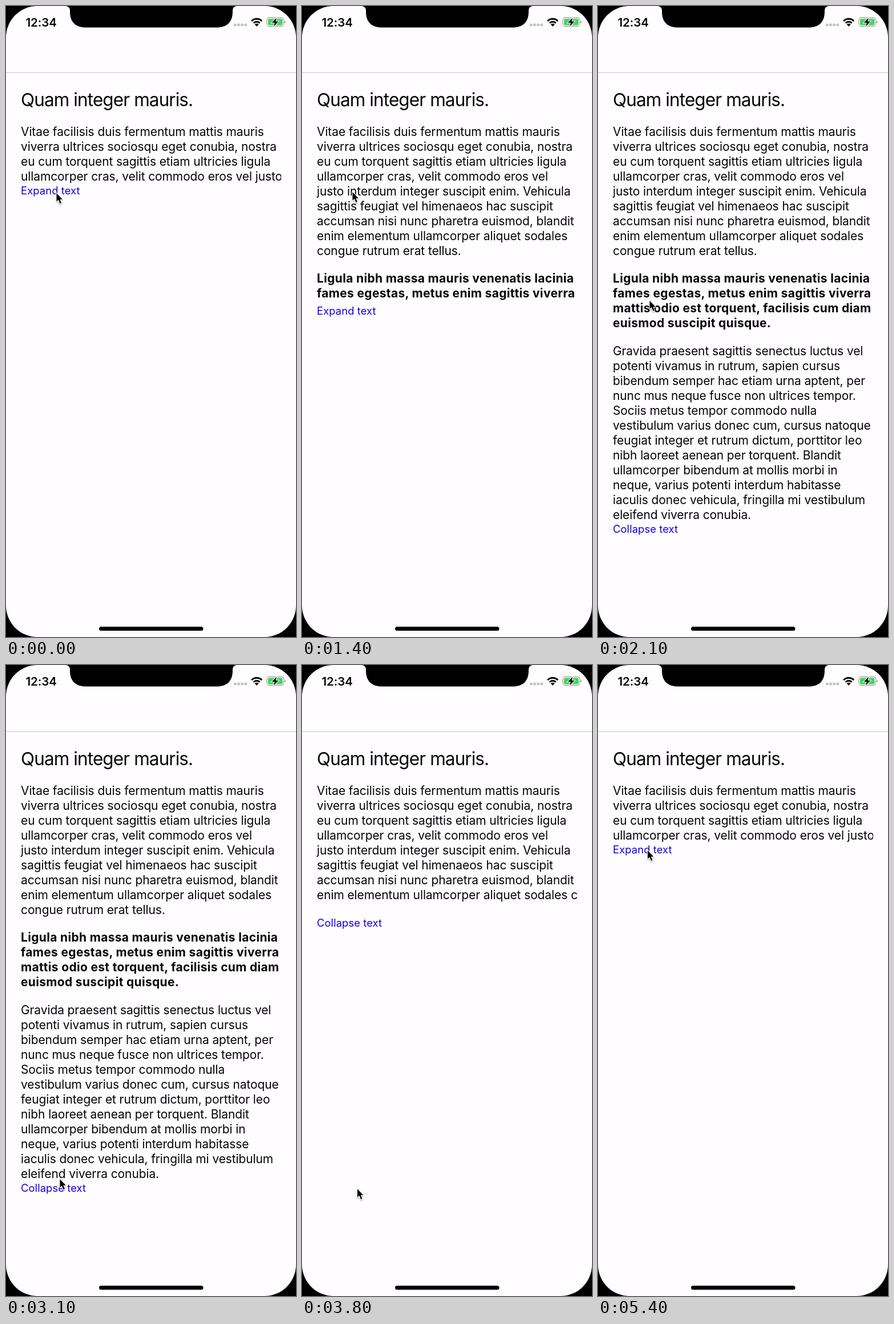
Write an HTML page that moves like this. It is 508 by 1102 pixels and loops after 5500 ms.

```html
<!DOCTYPE html>
<html lang="la">
<head>
<meta charset="utf-8">
<title>Expandable text</title>
<style>
  html, body { margin: 0; width: 100%; height: 100%; overflow: hidden; background: #000; }
  svg { display: block; width: 508px; height: 1102px; }
  text {
    font-family: Inter, "Liberation Sans", sans-serif;
    font-optical-sizing: none;
    fill: #050507;
    white-space: pre;
  }
  .time { font-size: 20.6px; font-weight: 600; letter-spacing: -.1px; }
  .title { font-size: 31.5px; letter-spacing: -.9px; }
  .body { font-size: 21px; letter-spacing: -.11px; }
  .bold { font-weight: 700; letter-spacing: .32px; }
  .link { font-size: 18.4px; letter-spacing: .08px; fill: #1400dc; }
</style>
</head>
<body>
<svg viewBox="0 0 508 1102">
  <defs>
    <clipPath id="column"><rect x="22" y="120" width="460" height="900"/></clipPath>
    <filter id="soft" x="-50%" y="-50%" width="200%" height="200%">
      <feDropShadow dx="0" dy="1.5" stdDeviation="1.2" flood-opacity=".35"/>
    </filter>
  </defs>

  <rect width="508" height="1102" fill="#000"/>
  <rect width="508" height="1102" rx="55" fill="#fffdff"/>
  <path d="M103 0C109 0 112 3 112 8V10C112 28 122 37.500 140 37.500H369C387 37.500 397 28 397 10V8C397 3 400 0 406 0Z"/>
  <rect y="116" width="508" height="1" fill="#c8c7cc"/>
  <rect x="163" y="1084" width="182.500" height="7" rx="3.500"/>

  <text class="time" x="34.500" y="35.500">12:34</text>
  <g fill="#c3c1c6">
    <circle cx="401.300" cy="33" r="2.500"/><circle cx="407.500" cy="33" r="2.500"/>
    <circle cx="413.700" cy="33" r="2.500"/><circle cx="419.900" cy="33" r="2.500"/>
  </g>
  <g fill="none" stroke="#000" stroke-width="3">
    <path d="M430.200 26.200A12.600 12.600 0 0 1 448.200 26.200"/>
    <path d="M433.700 29.800A7.700 7.700 0 0 1 444.700 29.800"/>
    <path d="M435.800 32.200A4.800 4.800 0 0 1 442.600 32.200L439.200 35.800Z" fill="#000" stroke="none"/>
  </g>
  <rect x="457" y="20.500" width="29.500" height="15" rx="4.200" fill="none" stroke="#a5a3a8" stroke-width="1.300"/>
  <rect x="459" y="22.500" width="25.500" height="11" rx="2.500" fill="#3fd65c"/>
  <path d="M488 25.500A2.600 2.600 0 0 1 488 30.500Z" fill="#a5a3a8"/>
  <path d="M474 20.500L465.800 29.200H470.700L469 35.800L477.300 27H472.400Z" stroke="#fffdff" stroke-width="2" paint-order="stroke"/>

  <text class="title" x="26" y="175">Quam integer mauris.</text>
  <g id="lines" clip-path="url(#column)"></g>
  <text id="link" class="link" x="26"></text>
  <path id="cursor" d="M0 0V14.500L3.300 11.500L6 18L8.500 17L5.800 10.700H10.300Z"
        stroke="#fff" stroke-width="2" stroke-linejoin="round" paint-order="stroke" filter="url(#soft)"/>
</svg>
<script>
  const LOOP = 5500, STEP = 100;
  const SHUT = 310, OPEN = 901;
  const LINE = 26, GAP = 22.5, FIRST = 226.5;
  const EXPAND = 1234, COLLAPSE = 3529, DURATION = 400, LABEL_DELAY = 50;

  const paragraphs = [
    ["Vitae facilisis duis fermentum mattis mauris",
     "viverra ultrices sociosqu eget conubia, nostra",
     "eu cum torquent sagittis etiam ultricies ligula",
     "ullamcorper cras, velit commodo eros vel",
     "justo interdum integer suscipit enim. Vehicula",
     "sagittis feugiat vel himenaeos hac suscipit",
     "accumsan nisi nunc pharetra euismod, blandit",
     "enim elementum ullamcorper aliquet sodales",
     "congue rutrum erat tellus."],
    ["Ligula nibh massa mauris venenatis lacinia",
     "fames egestas, metus enim sagittis viverra",
     "mattis odio est torquent, facilisis cum diam",
     "euismod suscipit quisque."],
    ["Gravida praesent sagittis senectus luctus vel",
     "potenti vivamus in rutrum, sapien cursus",
     "bibendum semper hac etiam urna aptent, per",
     "nunc mus neque fusce non ultrices tempor.",
     "Sociis metus tempor commodo nulla",
     "vestibulum varius donec cum, cursus natoque",
     "feugiat integer et rutrum dictum, porttitor leo",
     "nibh laoreet aenean per torquent. Blandit",
     "ullamcorper bibendum at mollis morbi in",
     "neque, varius potenti interdum habitasse",
     "iaculis donec vehicula, fringilla mi vestibulum",
     "eleifend viverra conubia."]
  ];

  // time, x, y of the pointer tip
  const path = [
    [0, 88.5, 327], [300, 88.5, 325], [1900, 88.5, 325], [2400, 94.5, 897],
    [3100, 94.5, 898], [3500, 96.5, 919], [3700, 96.5, 919], [3800, 97, 915],
    [4000, 97.5, 880], [4300, 99.5, 708], [4600, 104, 550], [4900, 108, 390],
    [5200, 94, 335], [5400, 87, 324]
  ];

  const group = document.getElementById("lines");
  const link = document.getElementById("link");
  const cursor = document.getElementById("cursor");

  const lines = [];
  let baseline = FIRST;
  paragraphs.forEach((rows, p) => {
    rows.forEach((row, i) => {
      const node = document.createElementNS("http://www.w3.org/2000/svg", "text");
      node.setAttribute("class", p === 1 ? "body bold" : "body");
      node.setAttribute("x", 26);
      node.setAttribute("y", baseline);
      group.append(node);
      const next = rows[i + 1];
      lines.push({ node, row, overflow: next ? row + " " + next : row, bottom: baseline + 5.5 });
      baseline += LINE;
    });
    baseline += GAP;
  });

  const clamp = v => Math.min(1, Math.max(0, v));

  // cubic-bezier(.42, 0, .58, 1), solved for its parameter by bisection
  function easeInOut(x) {
    if (x <= 0 || x >= 1) return clamp(x);
    let lo = 0, hi = 1;
    for (let i = 0; i < 24; i++) {
      const s = (lo + hi) / 2, r = 1 - s;
      if (1.26 * r * r * s + 1.74 * r * s * s + s * s * s < x) lo = s; else hi = s;
    }
    return lo * lo * (3 - 2 * lo);
  }

  function pointer(t) {
    const i = path.findIndex(k => k[0] > t);
    if (i < 0) return path[path.length - 1].slice(1);
    const a = path[i - 1], b = path[i];
    const f = easeInOut((t - a[0]) / (b[0] - a[0]));
    return [a[1] + (b[1] - a[1]) * f, a[2] + (b[2] - a[2]) * f];
  }

  function draw(t) {
    const open = easeInOut((t - EXPAND) / DURATION) - easeInOut((t - COLLAPSE) / DURATION);
    const bottom = SHUT + (OPEN - SHUT) * open;
    // Only whole lines fit; the last one runs on unwrapped.
    const count = lines.filter(l => l.bottom <= bottom + .1).length;
    lines.forEach((l, i) => {
      l.node.textContent = i >= count ? "" : i === count - 1 ? l.overflow : l.row;
    });

    const done = DURATION + LABEL_DELAY;
    const expanded = t >= EXPAND + done && t < COLLAPSE + done;
    link.textContent = expanded ? "Collapse text" : "Expand text";
    link.setAttribute("y", bottom + 18.5);
    cursor.setAttribute("transform", `translate(${pointer(t)})`);
  }

  const start = performance.now();
  let last = -1;
  function tick() {
    const t = Math.floor(((performance.now() - start) % LOOP) / STEP) * STEP;
    if (t !== last) draw(last = t);
    requestAnimationFrame(tick);
  }
  tick();
</script>
</body>
</html>
```
